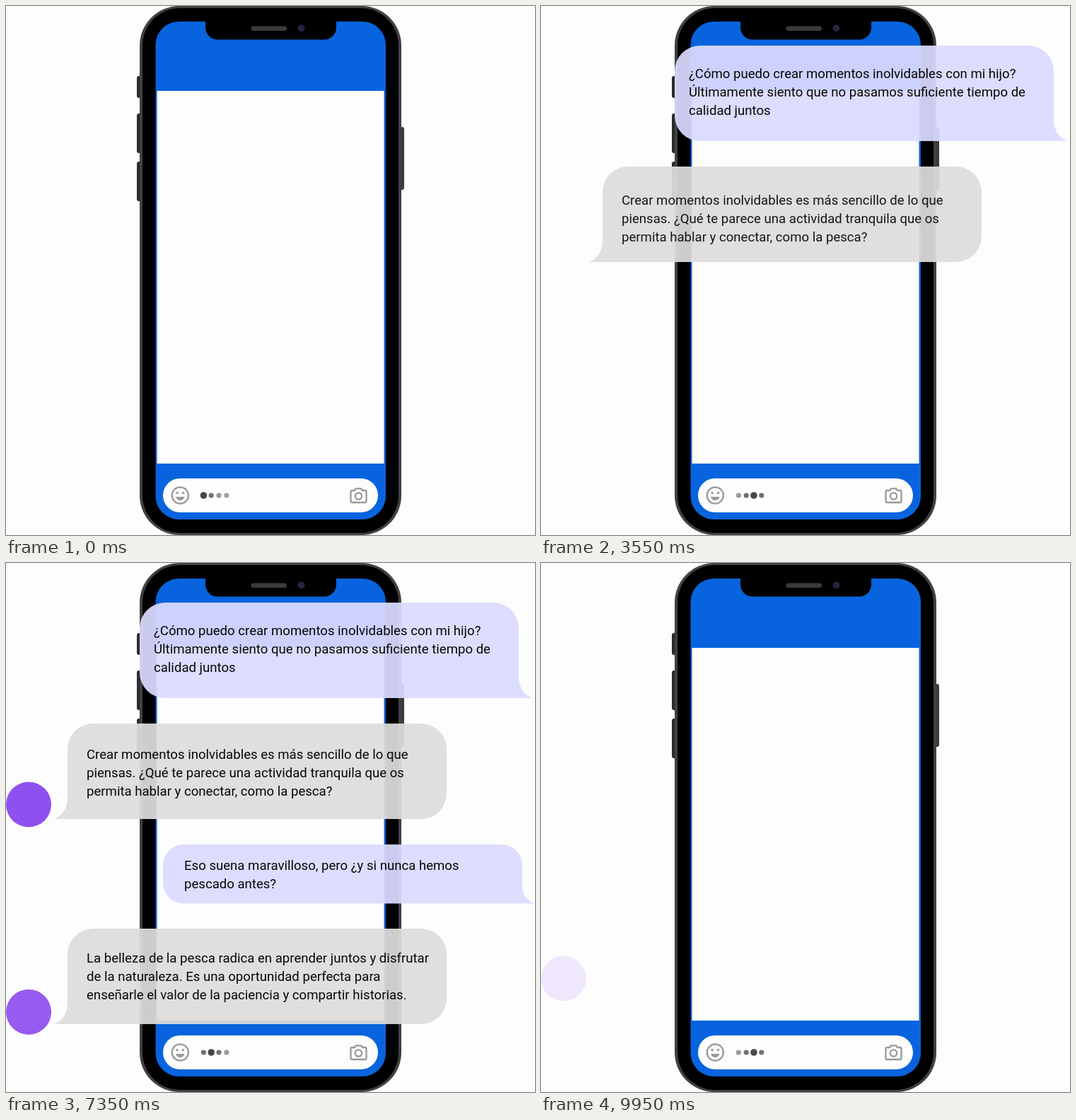
An HTML page with a canvas for the animation above (10 s loop, 748 by 748 pixels).

```html
<!DOCTYPE html>
<html lang="es">
<head>
<meta charset="utf-8">
<title>Chat</title>
<style>
html, body { margin: 0; width: 100%; height: 100%; overflow: hidden; background: #fdfdfd; }
canvas { display: block; width: 748px; height: 748px; }
</style>
</head>
<body>
<canvas id="stage"></canvas>
<script>
const SIZE = 748, LOOP = 10000;
const canvas = document.getElementById('stage');
const ctx = canvas.getContext('2d');
const ratio = window.devicePixelRatio || 1;
canvas.width = canvas.height = Math.round(SIZE * ratio);

const LILAC = '#dbdbff', GREY = '#dfdddb', PURPLE = '#8f50f0', BLUE = '#0864de', ICON = '#999999';
const ENTER = { time: 600, rise: 55 };
const EXIT = { start: 8989, gap: 75, time: 305, rise: 50 };

const clamp = v => Math.min(1, Math.max(0, v));

function box(x0, y0, x1, y1, r, fill) {
  ctx.fillStyle = fill;
  ctx.beginPath();
  ctx.roundRect(x0, y0, x1 - x0, y1 - y0, r);
  ctx.fill();
}

function disc(x, y, r, fill) {
  ctx.fillStyle = fill;
  ctx.beginPath();
  ctx.arc(x, y, r, 0, Math.PI * 2);
  ctx.fill();
}

// Speech bubble: "side" is the flat edge that carries the tail, "far" the rounded one.
function bubble(far, side, tip, top, bottom, r, fill) {
  const dir = Math.sign(side - far);
  return () => {
    ctx.globalAlpha *= 0.93;
    ctx.fillStyle = fill;
    ctx.beginPath();
    ctx.moveTo(far + dir * r, top);
    ctx.arcTo(side, top, side, top + r, r);
    ctx.lineTo(side, bottom - r * 0.85);
    ctx.bezierCurveTo(side, bottom - r * 0.4, side + dir * 8, bottom - 4, tip, bottom);
    ctx.lineTo(far + dir * r, bottom);
    ctx.arcTo(far, bottom, far, bottom - r, r);
    ctx.arcTo(far, top, far + dir * r, top, r);
    ctx.fill();
  };
}

function words(x, y, ...lines) {
  return () => {
    ctx.font = '18.6px Roboto, sans-serif';
    ctx.fillStyle = '#080808';
    lines.forEach((line, i) => ctx.fillText(line, x, y + i * 26));
  };
}

const avatar = y => () => disc(32, y, 32, PURPLE);

// Listed in order of appearance.
const parts = [
  [1290, bubble(189, 725, 745, 56, 191, 36, LILAC)],
  [1536, words(209, 102,
    '¿Cómo puedo crear momentos inolvidables con mi hijo?',
    'Últimamente siento que no pasamos suficiente tiempo de',
    'calidad juntos')],
  [2865, bubble(623, 87, 67, 227, 362, 36, GREY)],
  [3111, words(114, 277,
    'Crear momentos inolvidables es más sencillo de lo que',
    'piensas. ¿Qué te parece una actividad tranquila que os',
    'permita hablar y conectar, como la pesca?')],
  [3700, avatar(341.5)],
  [4440, bubble(222, 730, 746, 398, 481.5, 29, LILAC)],
  [4686, words(252, 434,
    'Eso suena maravilloso, pero ¿y si nunca hemos',
    'pescado antes?')],
  [6015, bubble(623, 87, 67, 517, 652, 36, GREY)],
  [6261, words(114, 565,
    'La belleza de la pesca radica en aprender juntos y disfrutar',
    'de la naturaleza. Es una oportunidad perfecta para',
    'enseñarle el valor de la paciencia y compartir historias.')],
  [6900, avatar(631.5)]
];

function drawPart(t, [start, draw], i) {
  const shown = 1 - (1 - clamp((t - start) / ENTER.time)) ** 2;
  const gone = clamp((t - EXIT.start - i * EXIT.gap) / EXIT.time) ** 2;
  const alpha = shown * (1 - gone);
  if (alpha <= 0) return;
  ctx.save();
  ctx.globalAlpha = alpha;
  ctx.translate(0, (1 - shown) * ENTER.rise - gone * EXIT.rise);
  draw();
  ctx.restore();
}

function drawPhone() {
  for (const [top, bottom] of [[99, 130], [152, 208], [220, 276]]) box(185, top, 195, bottom, 3, '#2c2c2c');
  box(550, 171, 563, 260, 3, '#3d3a42');
  box(189, 0, 559, 748, 56, '#414141');
  box(193, 3, 555, 745, 53, '#000');
  box(211.5, 22, 537, 726, 33, BLUE);
  box(213.5, 120, 534.5, 647, 0, '#fdfdfd');
  box(282, 18, 467, 47.5, [0, 0, 17, 17], '#000');
  box(346.5, 28.5, 397, 35, 3.2, '#3b3b3b');
  disc(417.5, 31.5, 5, '#282240');
}

function drawInput() {
  box(222, 668, 526, 716, 24, '#fdfdfd');
  ctx.strokeStyle = ICON;
  ctx.lineWidth = 2.3;
  ctx.lineJoin = 'round';

  ctx.beginPath();
  ctx.arc(246.3, 692, 11.6, 0, Math.PI * 2);
  ctx.stroke();
  disc(242.1, 688.5, 1.8, ICON);
  disc(250.5, 688.5, 1.8, ICON);
  ctx.beginPath();
  ctx.moveTo(240, 694);
  ctx.quadraticCurveTo(241.5, 699, 246.3, 699);
  ctx.quadraticCurveTo(251, 699, 252.6, 694);
  ctx.closePath();
  ctx.fill();

  ctx.beginPath();
  ctx.moveTo(489.5, 685);
  for (const [x, y] of [[493, 685], [495, 682.3], [502, 682.3], [504, 685], [507.5, 685]]) ctx.lineTo(x, y);
  ctx.arcTo(509.5, 685, 509.5, 688, 2);
  ctx.arcTo(509.5, 702, 507, 702, 2);
  ctx.arcTo(487.5, 702, 487.5, 700, 2);
  ctx.arcTo(487.5, 685, 490, 685, 2);
  ctx.closePath();
  ctx.stroke();
  ctx.beginPath();
  ctx.arc(498.5, 693, 4.7, 0, Math.PI * 2);
  ctx.stroke();
}

// The highlight runs back and forth over four dots.
function drawDots(t) {
  const step = Math.floor(t / 1474 * 6) % 6;
  const active = step < 4 ? step : 6 - step;
  const shades = ['#474747', '#717171', '#9a9a9a', '#a3a3a3'];
  for (let i = 0; i < 4; i++) {
    const d = Math.abs(i - active);
    disc(279.4 + i * 10.8, 692, d ? 3.6 : 4.8, shades[d]);
  }
}

function frame(now) {
  const t = now % LOOP;
  ctx.setTransform(ratio, 0, 0, ratio, 0, 0);
  ctx.fillStyle = '#fdfdfd';
  ctx.fillRect(0, 0, SIZE, SIZE);
  drawPhone();
  drawInput();
  drawDots(t);
  parts.forEach((part, i) => drawPart(t, part, i));
}

let origin;
function tick(now) {
  origin ??= now;
  frame(now - origin);
  requestAnimationFrame(tick);
}
frame(0);
requestAnimationFrame(tick);
</script>
</body>
</html>
```
